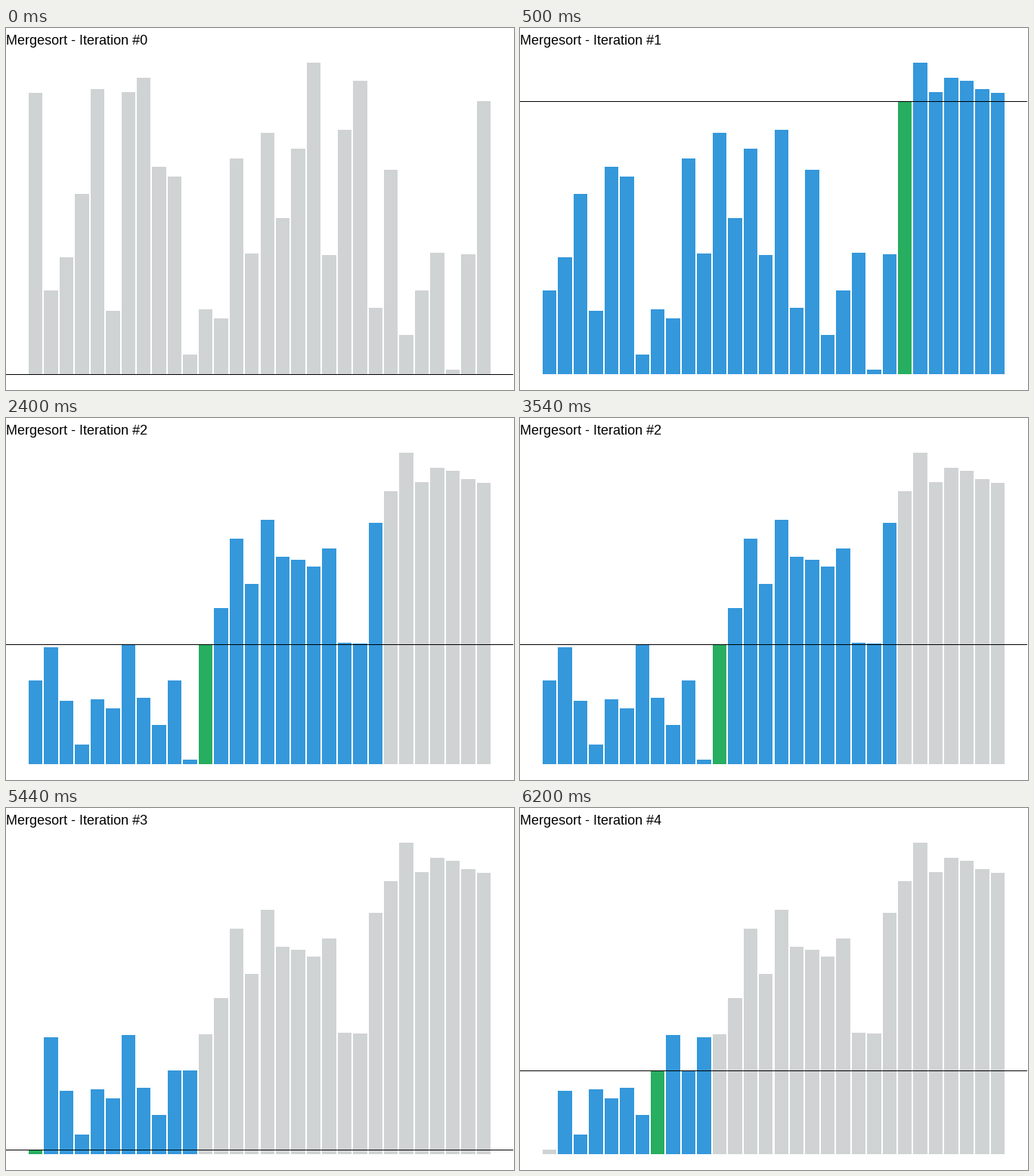
Recreate the animation shown at these times as a matplotlib script. Size 672 by 480 pixels, loop 8 s.

```python
import math

import matplotlib.pyplot as plt
from matplotlib.animation import FuncAnimation
from matplotlib.patches import Rectangle

WIDTH, HEIGHT, DPI = 672, 480, 96
BASE = 459
GREY, BLUE, GREEN = "#d0d3d4", "#3498db", "#27ae60"
STEP_MS, FIRST_MS, HOLD_MS, LOOP_MS = 100, 500, 1900, 8000
SHOWN_STEPS = 4
BAR_WIDTH = 0.9

HEIGHTS = [373, 111, 155, 239, 378, 84, 374, 393, 275, 262,
           26, 86, 74, 286, 160, 320, 207, 299, 413, 158,
           324, 389, 88, 271, 52, 111, 161, 6, 159, 362]
COUNT = len(HEIGHTS)


def partition(values, lo, hi):
    """Move the last value of the range to its sorted place."""
    place = lo
    for j in range(lo, hi):
        if values[j] < values[hi]:
            values[place], values[j] = values[j], values[place]
            place += 1
    values[place], values[hi] = values[hi], values[place]
    return place


def sort_steps(values, lo, hi):
    if lo >= hi:
        return
    pivot = partition(values, lo, hi)
    yield list(values), lo, hi, pivot
    yield from sort_steps(values, lo, pivot - 1)
    yield from sort_steps(values, pivot + 1, hi)


steps = [(HEIGHTS, 0, -1, None)]
for step in sort_steps(list(HEIGHTS), 0, COUNT - 1):
    steps.append(step)
    if len(steps) > SHOWN_STEPS:
        break

fig = plt.figure(figsize=(WIDTH / DPI, HEIGHT / DPI), dpi=DPI, facecolor="white")
ax = fig.add_axes([0, 0, 1, 1])
ax.set(xlim=(0, WIDTH), ylim=(HEIGHT, 0))
ax.axis("off")


def add_box(x, y, w, h, color, zorder=1):
    return ax.add_patch(Rectangle((x, y), w, h, facecolor=color, linewidth=0,
                                  antialiased=False, zorder=zorder))


# The data range is padded by 5% on each side.
span = COUNT - 1 + BAR_WIDTH
unit = WIDTH / (1.1 * span)
bars = []
for i in range(COUNT):
    left = (0.05 * span + i) * unit
    x0, x1 = math.floor(left), math.floor(left + BAR_WIDTH * unit)
    bars.append(add_box(x0, BASE, x1 - x0, 0, GREY))
level = add_box(0, BASE, WIDTH - 1, 1, "black", zorder=3)
title = ax.text(0, 22, "", family="Liberation Sans", size=18 * 72 / DPI,
                color="black", va="baseline")


def update(frame):
    t = frame * STEP_MS
    n = 0 if t < FIRST_MS else 1 + (t - FIRST_MS) // HOLD_MS
    values, lo, hi, pivot = steps[n]
    for i, (bar, value) in enumerate(zip(bars, values)):
        bar.set_y(BASE - value)
        bar.set_height(value)
        bar.set_facecolor(GREEN if i == pivot else BLUE if lo <= i <= hi else GREY)
    level.set_y(BASE if pivot is None else BASE - values[pivot])
    title.set_text(f"Mergesort - Iteration #{n}")
    return [*bars, level, title]


anim = FuncAnimation(fig, update, frames=LOOP_MS // STEP_MS, interval=STEP_MS,
                     repeat=True, repeat_delay=0)
plt.show()
```
